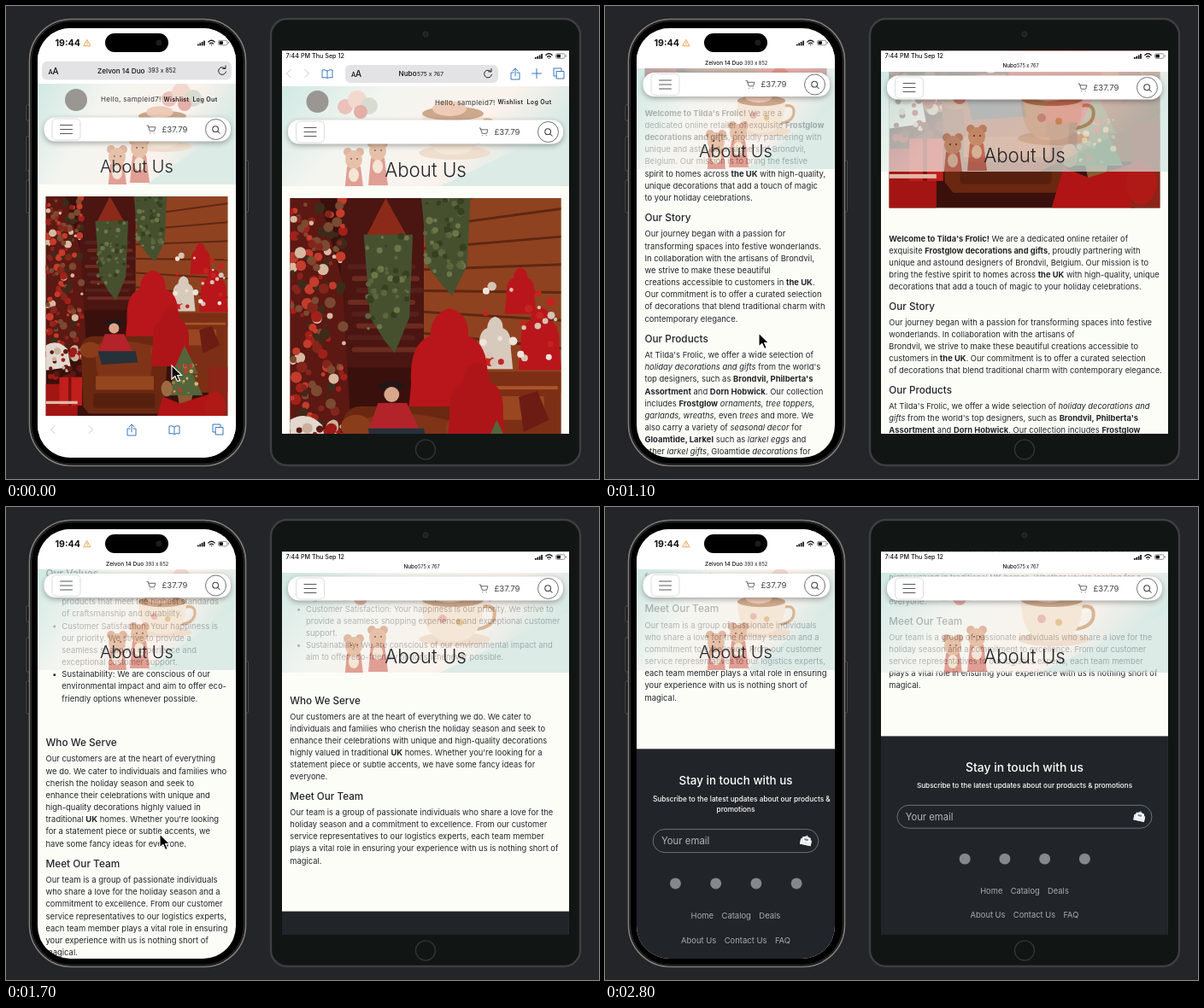
An HTML page that plays this animation: 694x554 px, repeating every 3.3 s.

```html
<!DOCTYPE html>
<html lang="en">
<head>
<meta charset="utf-8">
<title>About Us</title>
<style>
html, body { margin: 0; width: 694px; height: 554px; overflow: hidden; background: #242529; }
body { position: relative; font-family: Inter, sans-serif; }
svg { display: block; }
svg text { font-family: Inter, sans-serif; white-space: pre; }
.layer, .screen { position: absolute; left: 0; top: 0; width: 694px; height: 554px; }
.screen { background: #fcfdf7; }
.page { position: absolute; left: 0; top: 0; transform-origin: 0 0; white-space: nowrap; font-size: 16px; line-height: 24px; color: #212529; }
.body { padding: 0 16px 74px; }
.body p, .body ul { margin: 0 0 16px; }
.body ul { padding-left: 32px; }
.body .intro { margin-top: 49px; }
.body h5 { margin: 0 0 8px; font-size: 20px; line-height: 24px; font-weight: 500; }
.body .gap { margin-top: 64px; }
footer { box-sizing: border-box; height: 440px; padding: 48px 32px 0; background: #212529; color: #fff; text-align: center; }
footer h4 { margin: 0 0 11px; line-height: 29px; font-weight: 500; }
footer p { margin: 0 0 29px; font-size: 14px; line-height: 21px; font-weight: 500; }
.field { position: relative; box-sizing: border-box; height: 47px; border: 1.5px solid #a5a8aa; border-radius: 24px; padding-left: 16px; text-align: left; font-size: 19.3px; line-height: 44px; color: #b4b6b8; }
.field svg { position: absolute; right: 11px; top: 9px; }
.row { display: flex; justify-content: center; height: 24px; }
.social { gap: 58px; margin: 49px 0 40px; align-items: center; }
.social i { width: 22px; height: 22px; border-radius: 50%; background: #85888b; }
.links { gap: 16px; margin-bottom: 24px; color: #a9abae; }
</style>
</head>
<body>
<script>
const LOOP = 3300, STEP = 100;

const devices = [
  {
    id: 'a', mark: '^', other: '|', clip: 'inset(26px 425px 25px 37px round 38px)',
    x: 37, w: 232, k: .5903, cssW: 393, photoY: 223, headY: 91, headH: 118, shift: 18, pillMove: 52.5, h4: 22.7,
    sub: 'Subscribe to the latest updates about our products &amp;<br>promotions',
    scroll: [[700, 0], [800, 40], [900, 136], [1000, 270], [1100, 400], [1200, 512], [1300, 608],
      [1700, 924.5], [1800, 1010], [1900, 1090], [2000, 1165], [2100, 1223]],
    title: [153, 188, 20], hello: [111, 109], logo: [82, 110],
    pill: [44.5, 130.5, 218.5], mice: [93, 119], cup: [146, 52, .78], blooms: [168, 14]
  },
  {
    id: 'b', mark: '|', other: '^', clip: 'inset(52.5px 35px 53px 323px)',
    x: 323, w: 336, k: .5843, cssW: 575, photoY: 225, headY: 94, headH: 117, shift: 17, pillMove: 52, h4: 23.8,
    sub: 'Subscribe to the latest updates about our products &amp; promotions',
    scroll: [[700, 0], [800, 34], [900, 115], [1000, 250], [1100, 385], [1200, 500], [1300, 597.4],
      [1700, 916.5], [1900, 1080], [2000, 1121.7]],
    title: [491, 192, 22.3], hello: [502, 112.5], logo: [364.5, 112],
    pill: [330, 133.5, 322], mice: [84, 112], cup: [200, 50, 1], blooms: [88, 20]
  }
];

const cursorPath = [[0, 194, 421], [200, 193, 418], [400, 186, 400], [600, 180, 383], [2400, 180, 383],
  [2500, 179, 402], [2600, 175, 452], [2700, 168, 520], [2800, 164, 570]];
const collapse = [[700, 0], [900, 1]];

// '^' breaks lines on the narrow screen, '|' on the wide one
const article = `
<p class="intro"><b>Welcome to Tilda's Frolic!</b> We are a ^dedicated online retailer of |exquisite <b>Frostglow ^decorations and gifts</b>, proudly partnering with |^unique and astound designers of Brondvil, ^Belgium. Our mission is to |bring the festive ^spirit to homes across <b>the UK</b> with high-quality, ^unique |decorations that add a touch of magic ^to your holiday celebrations.</p>
<h5>Our Story</h5>
<p>Our journey began with a passion for ^transforming spaces into festive |wonderlands. ^In collaboration with the artisans of |Brondvil, ^we strive to make these beautiful ^creations accessible to |customers in <b>the UK</b>. ^Our commitment is to offer a curated selection |^of decorations that blend traditional charm with ^contemporary elegance.</p>
<h5>Our Products</h5>
<p>At Tilda's Frolic, we offer a wide selection of ^<i>holiday decorations and |gifts</i> from the world's ^top designers, such as <b>Brondvil, Philberta's |^Assortment</b> and <b>Dorn Hobwick</b>. Our collection ^includes <b>Frostglow</b> |<i>ornaments, tree toppers, ^garlands, wreaths</i>, even <i>trees</i> and more. We |^also carry a variety of <i>seasonal decor</i> for ^<b>Gloamtide, Larkel</b> such as |<i>larkel eggs</i> and ^other <i>larkel gifts</i>, Gloamtide <i>decorations</i> for ^both |adults and kids. Shop now and make your ^home merry and bright!</p>
<h5 class="gap">Our Values</h5>
<ul><li>Quality: We are committed to offering ^products that meet the |highest standards ^of craftsmanship and durability.</li>
<li>Customer Satisfaction: Your happiness is ^our priority. We strive to |provide a ^seamless shopping experience and ^exceptional customer |support.</li>
<li>Sustainability: We are conscious of our ^environmental impact and |aim to offer eco-^friendly options whenever possible.</li></ul>
<h5 class="gap">Who We Serve</h5>
<p>Our customers are at the heart of everything ^we do. We cater to |individuals and families who ^cherish the holiday season and seek to |^enhance their celebrations with unique and ^high-quality decorations |highly valued in ^traditional <b>UK</b> homes. Whether you're looking ^for a |statement piece or subtle accents, we ^have some fancy ideas for |everyone.</p>
<h5>Meet Our Team</h5>
<p>Our team is a group of passionate individuals ^who share a love for the |holiday season and a ^commitment to excellence. From our customer |^service representatives to our logistics experts, ^each team member |plays a vital role in ensuring ^your experience with us is nothing short of |^magical.</p>`;

const icons = {
  back: 'M2-4.5-2.5 0 2 4.5', fwd: 'M-2-4.5 2.5 0-2 4.5',
  share: 'M-2-2H-5V6H5V-2H2M0 2V-7M-3-4 0-7 3-4',
  book: 'M0-3Q-3-5-6-4V5Q-3 4 0 5.5Q3 4 6 5V-4Q3-5 0-3V5.5',
  tabs: 'M-2.5-2.5H6V6H-2.5ZM-2.5 3H-6V-6H3V-2.5',
  plus: 'M-5.5 0H5.5M0-5.5V5.5',
  reload: 'M3.6-2.6A4.4 4.4 0 1 0 4.4 1M4-6V-2.6H.6',
  cart: 'M-5.5-5H-4L-2 2H4L5.5-3H-3.5M-1.5 4.6v.2M3.5 4.6v.2',
  search: 'M3-1A4 4 0 1 0-5-1A4 4 0 1 0 3-1M2 2 5 5',
  menu: 'M-7-5H7M-7 0H7M-7 5H7',
  warn: 'M0-3.5 4 3.5H-4ZM0-1V1M0 2.3v.1',
  wifi: 'M-3.6-1Q0-4.4 3.6-1M-1.9 1Q0-.7 1.9 1M0 2.6v.1'
};
const icon = (name, x, y, color, s = 1, width = 1) =>
  `<path d="${icons[name]}" transform="translate(${x} ${y}) scale(${s})" fill="none" stroke="${color}" stroke-width="${width}" stroke-linecap="round" stroke-linejoin="round"/>`;
const text = (x, y, size, str, weight = 400, fill = '#111', extra = '') =>
  `<text x="${x}" y="${y + size * .36}" font-size="${size}" font-weight="${weight}" fill="${fill}" ${extra}>${str}</text>`;
const rect = (x, y, w, h, fill, r = 0, extra = '') =>
  `<rect x="${x}" y="${y}" width="${w}" height="${h}" rx="${r}" fill="${fill}" ${extra}/>`;
const circle = (x, y, r, fill, extra = '') => `<circle cx="${x}" cy="${y}" r="${r}" fill="${fill}" ${extra}/>`;
const oval = (x, y, rx, ry, fill) => `<ellipse cx="${x}" cy="${y}" rx="${rx}" ry="${ry}" fill="${fill}"/>`;
const path = (d, fill, extra = '') => `<path d="${d}" fill="${fill}" ${extra}/>`;

function random(seed) {
  return () => (seed = (seed * 16807) % 2147483647) / 2147483647;
}

// Flat-shape stand-in for the shop photograph
function photo() {
  const rnd = random(77);
  const dots = (n, x, y, w, h, colors, r) => Array.from({ length: n }, () =>
    circle((x + rnd() * w).toFixed(1), (y + rnd() * h).toFixed(1), (r * (.5 + rnd())).toFixed(1), colors[rnd() * colors.length | 0])).join('');
  const figure = (x, y, s, fill = '#b8161a') =>
    path('M0 0Q16 4 15 22Q32 28 30 60L34 100H-34L-30 60Q-32 28-15 22Q-14 4 0 0Z', fill, `transform="translate(${x} ${y}) scale(${s})"`);
  const plant = (x, y, w, h) => path(`M${x} ${y}h${w}l-4 ${h * .7}l-${w * .3} ${h * .3}l-${w * .2}-${h * .1}l-${w * .3}-${h * .2}Z`, '#46502f')
    + dots(45, x + 4, y, w - 10, h * .8, ['#5b663d', '#35401f', '#6d7648'], 3);
  let s = rect(0, 0, 320, 400, '#3a100c') + rect(60, 0, 100, 200, '#4b1511');
  for (let i = 0; i < 8; i++) s += rect(68 + i % 3 * 5, 78 + i * 14, 80, 6, i % 2 ? '#6b2b20' : '#55201a', 3);
  s += path('M158 0H320V230H158Z', '#8f4220');
  for (let i = 0; i < 7; i++) s += path(`M158 ${8 + i * 25}L320 ${i * 33 - 22}v3L158 ${11 + i * 25}Z`, '#5f2712');
  s += path('M113 0 90 45H138Z', '#8c2a1a') + plant(87, 43, 58, 140) + plant(155, 0, 58, 115);
  s += path('M0 0H35L62 100 72 275H0Z', '#5c1812')
    + dots(170, 0, 0, 64, 285, ['#a3201a', '#c43c2c', '#7a4a32', '#3d2b1a', '#d9b8a0', '#84251c'], 4.5);
  s += rect(222, 205, 98, 140, '#7c2f14') + rect(226, 222, 90, 4, '#a8552a') + rect(240, 234, 60, 28, '#9a4620');
  s += figure(272, 82, .55) + figure(295, 128, .75) + figure(242, 140, .62, '#d8c9bd')
    + dots(26, 228, 100, 88, 95, ['#efe4da', '#d6c4b4', '#c4241f'], 4);
  s += figure(188, 130, 1.5) + path('M270 235 292 228 306 262 276 276Z', '#6d1c14');
  s += path('M0 262Q20 250 38 268L44 300 0 306Z', '#e2d8cf') + dots(30, 0, 270, 64, 60, ['#9c1a17', '#5c1812', '#c9b19c'], 5);
  s += path('M62 268Q64 245 88 246H190Q216 250 214 285L208 372 196 382H76L66 370Z', '#6a2811')
    + path('M84 262Q130 246 192 264L184 318H92Z', '#7f3417') + path('M88 316H190V340H88Z', '#94461f')
    + oval(78, 270, 18, 14, '#8a3d1b') + oval(200, 272, 16, 14, '#8a3d1b') + rect(84, 346, 108, 26, '#57200e', 4);
  s += oval(120, 222, 16, 6, '#241617') + circle(120, 232, 9, '#d9a68a') + path('M104 242H138L152 272 92 276Z', '#b3232a') + path('M92 272H158L162 292 98 296Z', '#26313a');
  s += figure(220, 194, 1.05, '#ad1519');
  s += path('M244 262 222 312 232 312 214 350H276L258 312 268 312Z', '#54653a') + dots(28, 222, 295, 44, 52, ['#d8b36a', '#c0392b', '#7a8a55'], 2.6)
    + path('M232 350H258L254 372H236Z', '#8a5a34') + oval(213, 338, 10, 14, '#9b6a42');
  s += rect(0, 330, 56, 70, '#a31513') + rect(24, 318, 40, 50, '#c01f1b') + rect(40, 318, 5, 50, '#7e0f0e') + rect(0, 360, 56, 5, '#e0b9a8')
    + path('M192 400 206 352 236 364 286 348 290 400Z', '#b11414') + rect(286, 300, 34, 100, '#8c2418') + oval(298, 370, 18, 26, '#b01a16');
  return `<svg viewBox="0 0 320 400" width="100%" preserveAspectRatio="none">${s}</svg>`;
}

function banner(d) {
  const mouse = (x, y) => path(`M${x - 11} ${y + 40}L${x - 8} ${y + 8}H${x + 8}L${x + 12} ${y + 40}Z`, '#d5786c')
    + circle(x - 7, y - 9, 5, '#d49c80') + circle(x + 7, y - 9, 5, '#d49c80') + oval(x, y, 10, 11, '#dda888')
    + oval(x, y + 18, 6, 8, '#f2dcc8') + circle(x - 3, y - 1, 1, '#523') + circle(x + 4, y - 1, 1, '#523');
  const [cx, cy, cs] = d.cup, [bx, by] = d.blooms;
  const petals = [[-14, 4, 9], [0, -4, 11], [14, 3, 10], [4, 10, 8]].map(([x, y, r], i) =>
    circle(bx + x, by + y, r, ['#e3a9a2', '#f0c9bd', '#c9cfc0', '#d98f86'][i])).join('');
  return `<svg x="${d.x}" y="${d.headY}" width="${d.w}" height="${d.headH}" opacity=".7">
    <defs><linearGradient id="sky-${d.id}" y2=".3"><stop stop-color="#bfe0dc"/><stop offset=".35" stop-color="#f1f3ee"/><stop offset=".75" stop-color="#fbeee8"/><stop offset="1" stop-color="#c9e2de"/></linearGradient></defs>
    ${rect(0, 0, d.w, d.headH, `url(#sky-${d.id})`)}
    ${path(`M${d.w * .55} ${d.headH}L${d.w} 45V${d.headH}Z`, '#cfe4e0')}
    ${petals}
    <g transform="translate(${cx} ${cy}) scale(${cs})">
      ${oval(2, 28, 42, 8, '#ead2bd')}
      ${path('M34-10Q52-14 48 4Q44 14 28 16', 'none', 'stroke="#c9976d" stroke-width="4"')}
      ${path('M-36-18H36Q36 26 8 30H-8Q-36 26-36-18Z', '#f3dfca')}${oval(0, -18, 36, 8, '#b98560')}
      ${oval(-4, -24, 20, 9, '#e9b79c')}${circle(-12, 4, 5, '#e2a59a')}${circle(8, 8, 4, '#d9b06e')}
    </g>
    ${mouse(d.mice[0], 86)}${mouse(d.mice[1], 76)}</svg>`;
}

function pill(d) {
  const [x, y, w] = d.pill, m = y + 14, r = x + w;
  return `<g id="pill-${d.id}">${rect(x, y, w, 28, '#fff', 13, 'style="filter:drop-shadow(0 2px 3px #0005)"')}
    ${rect(x + 9.5, y + 1.5, 33, 25, '#fff', 5, 'stroke="#dcdddd"')}${icon('menu', x + 26, m, '#55585a')}
    ${icon('cart', r - 93, m, '#55585a', .9)}${text(r - 80.5, m, 9.6, '£37.79', 400, '#444')}
    ${circle(r - 17.5, m, 12, '#fff', 'stroke="#6d7072"')}${icon('search', r - 17, m + .5, '#444', .85, 1.2)}</g>`;
}

function header(d) {
  const [hx, hy] = d.hello, [tx, ty, size] = d.title, ls = 'letter-spacing=".35"';
  return `<g id="head-${d.id}">${banner(d)}${text(tx, ty, size, 'About Us', 300, '#212529', 'text-anchor="middle"')}</g>
    <g id="row-${d.id}">${circle(...d.logo, 13, '#9a9793')}
      ${text(hx, hy + .5, 8, 'Hello, sampleid7!', 400, '#333', ls)}
      ${text(hx + 73.5, hy, 7, 'Wishlist', 600, '#222', ls)}${text(hx + 107.5, hy, 7, 'Log Out', 600, '#222', ls)}</g>${pill(d)}`;
}

function status(x, y) {
  const bars = [0, 1, 2, 3].map(i => rect(x + i * 2.4, y + 1.5 - i * 1.3, 1.7, 2 + i * 1.3, '#111', .4)).join('');
  return bars + icon('wifi', x + 16.5, y, '#111', 1, 1.3)
    + rect(x + 24.5, y - 2.7, 10.5, 5.6, 'none', 1.7, 'stroke="#777" stroke-width=".8"') + rect(x + 25.5, y - 1.7, 4.5, 3.6, '#111', .8) + rect(x + 35.8, y - 1, 1, 2, '#777', .5);
}

const blue = '#3a77bd', pale = '#c4c6c9';
const aa = (x, y) => text(x, y + .8, 7.5, 'A', 500) + text(x + 5, y, 10, 'A', 500);
const chromes = {
  a: `<rect id="top-a" x="37" y="20" width="232" height="71" fill="#fff"/>
    <g id="bar-a">${rect(42, 65, 222, 21.5, '#e3e3e5', 6)}${aa(49.5, 76)}
      ${text(107, 76, 8.2, 'Zelvon 14 Duo', 500)}${text(166, 76, 6.9, '393 x 852')}${icon('reload', 253, 76, '#222')}</g>
    <g id="mini-a">${text(117, 66.5, 6.5, 'Zelvon 14 Duo', 500)}${text(163, 66.5, 5.7, '393 x 852')}</g>
    ${text(57.5, 43, 10.6, '19:44', 700)}${icon('warn', 95, 43.3, '#f0a45a')}
    ${rect(116, 32, 74, 22, '#000', 11)}${circle(179, 43, 3.5, '#1a1c22')}${status(224, 43)}
    <g id="tools-a">${rect(37, 480, 232, 60, '#fff')}${icon('back', 55, 496, pale)}${icon('fwd', 99, 496, pale)}
      ${icon('share', 147, 497, blue)}${icon('book', 197, 496, blue)}${icon('tabs', 248, 496, blue)}</g>`,
  b: `<rect id="top-b" x="323" y="40" width="336" height="54" fill="#fff"/>
    <g id="bar-b">${rect(397, 69, 179, 21, '#e3e3e5', 6)}${aa(404, 79.5)}
      ${text(459.5, 79.5, 8.2, 'Nubo', 500)}${text(481, 79.5, 6.8, '575 x 767')}${icon('reload', 564, 79.5, '#222')}
      ${icon('back', 331, 79, pale)}${icon('fwd', 352, 79, pale)}${icon('book', 376, 79, blue)}
      ${icon('share', 596, 80, blue)}${icon('plus', 621, 79, blue)}${icon('tabs', 647, 79, blue)}</g>
    <g id="mini-b">${text(465.5, 70, 6.3, 'Nubo', 500)}${text(482, 70, 5.6, '575 x 767')}</g>
    ${text(327.5, 58.5, 7.2, '7:44 PM Thu Sep 12', 500)}${status(619, 58.5)}`
};

const frames = `<svg class="layer" viewBox="0 0 694 554">
  ${[[24, 116, 18], [24, 153, 40], [24, 204, 38], [280, 181, 60]].map(([x, y, h]) => rect(x, y, 3.5, h, '#15161a', 1, 'stroke="#5c5a56" stroke-width=".8"')).join('')}
  ${rect(27.5, 15.5, 253, 523, '#000', 49, 'stroke="#84807a" stroke-width="1.6"')}
  ${rect(29.5, 17.5, 249, 519, 'none', 47, 'stroke="#26272a" stroke-width="1.5"')}
  ${rect(310, 15, 362, 523, '#111514', 19, 'stroke="#3c3f42" stroke-width="2.4"')}
  ${circle(491, 33, 3, '#1c2022', 'stroke="#2b3033"')}${circle(491, 519.5, 11.5, 'none', 'stroke="#2f3436" stroke-width="1.5"')}</svg>`;

const links = (...names) => `<div class="row links">${names.map(n => `<span>${n}</span>`).join('')}</div>`;
const footer = d => `<footer><h4 style="font-size:${d.h4}px">Stay in touch with us</h4><p>${d.sub}</p>
  <div class="field">Your email<svg width="26" height="26" viewBox="-13 -13 26 26"><g transform="rotate(12)">
    ${path('M-11-2 0-11 11-2V9H-11Z', '#c9ced2')}${rect(-8, -7, 16, 10, '#fff')}${rect(-4, -4, 8, 4, '#6f93ad')}${path('M-11-2 0 5 11-2V9H-11Z', '#eef0f1')}</g></svg></div>
  <div class="row social"><i></i><i></i><i></i><i></i></div>
  ${links('Home', 'Catalog', 'Deals')}${links('About Us', 'Contact Us', 'FAQ')}</footer>`;

const screen = d => `<div class="screen" style="clip-path:${d.clip}">
  <div class="page" id="page-${d.id}" style="width:${d.cssW}px"><div class="body">${photo()}
    ${article.replaceAll(d.other, '').replaceAll(d.mark, '<br>')}</div>${footer(d)}</div>
  <svg class="layer" viewBox="0 0 694 554">${header(d)}${chromes[d.id]}</svg></div>`;

const pointer = `<svg class="layer" viewBox="0 0 694 554"><g id="cursor">
  <path id="arrow" d="M0 0V16L3.8 12.5 6.6 18.6 9.3 17.4 6.6 11.5H11.6Z" fill="#000" stroke="#fff" stroke-width="1.1"/>
  <g id="beam" fill="none" stroke-linecap="round">${['#fff" stroke-width="3', '#222" stroke-width="1.1'].map(c =>
    `<path d="M-3-5Q0-5 0-3Q0-5 3-5M0-3V6M-3 8Q0 8 0 6Q0 8 3 8M-1.5 2H1.5" stroke="${c}"/>`).join('')}</g></g></svg>`;

document.body.insertAdjacentHTML('beforeend', frames + devices.map(screen).join('') + pointer);

const el = id => document.getElementById(id);
const move = (id, x, y) => el(id).setAttribute('transform', `translate(${x} ${y})`);

function sample(table, t, col = 1) {
  const i = table.findIndex(row => row[0] > t);
  if (i === 0) return table[0][col];
  if (i < 0) return table[table.length - 1][col];
  const a = table[i - 1], b = table[i];
  return a[col] + (b[col] - a[col]) * (t - a[0]) / (b[0] - a[0]);
}

function draw(t) {
  const c = sample(collapse, t);
  for (const d of devices) {
    const s = sample(d.scroll, t), lift = -d.shift * c;
    el('page-' + d.id).style.transform = `translate(${d.x}px, ${d.photoY - s}px) scale(${d.k})`;
    move('head-' + d.id, 0, lift);
    move('row-' + d.id, 0, -s);
    move('pill-' + d.id, 0, -Math.min(s, d.pillMove));
    move('top-' + d.id, 0, lift);
    move('bar-' + d.id, 0, lift);
    el('bar-' + d.id).setAttribute('opacity', 1 - c);
    el('mini-' + d.id).setAttribute('opacity', c);
  }
  move('tools-a', 0, 60 * c);
  move('cursor', sample(cursorPath, t, 1), sample(cursorPath, t, 2));
  const typing = t >= 2100 && t < 2600;
  el('arrow').style.display = typing ? 'none' : '';
  el('beam').style.display = typing ? '' : 'none';
}

const start = performance.now();
function tick() {
  const t = (performance.now() - start) % LOOP;
  draw(Math.floor(t / STEP) * STEP);
  requestAnimationFrame(tick);
}
tick();
</script>
</body>
</html>
```
